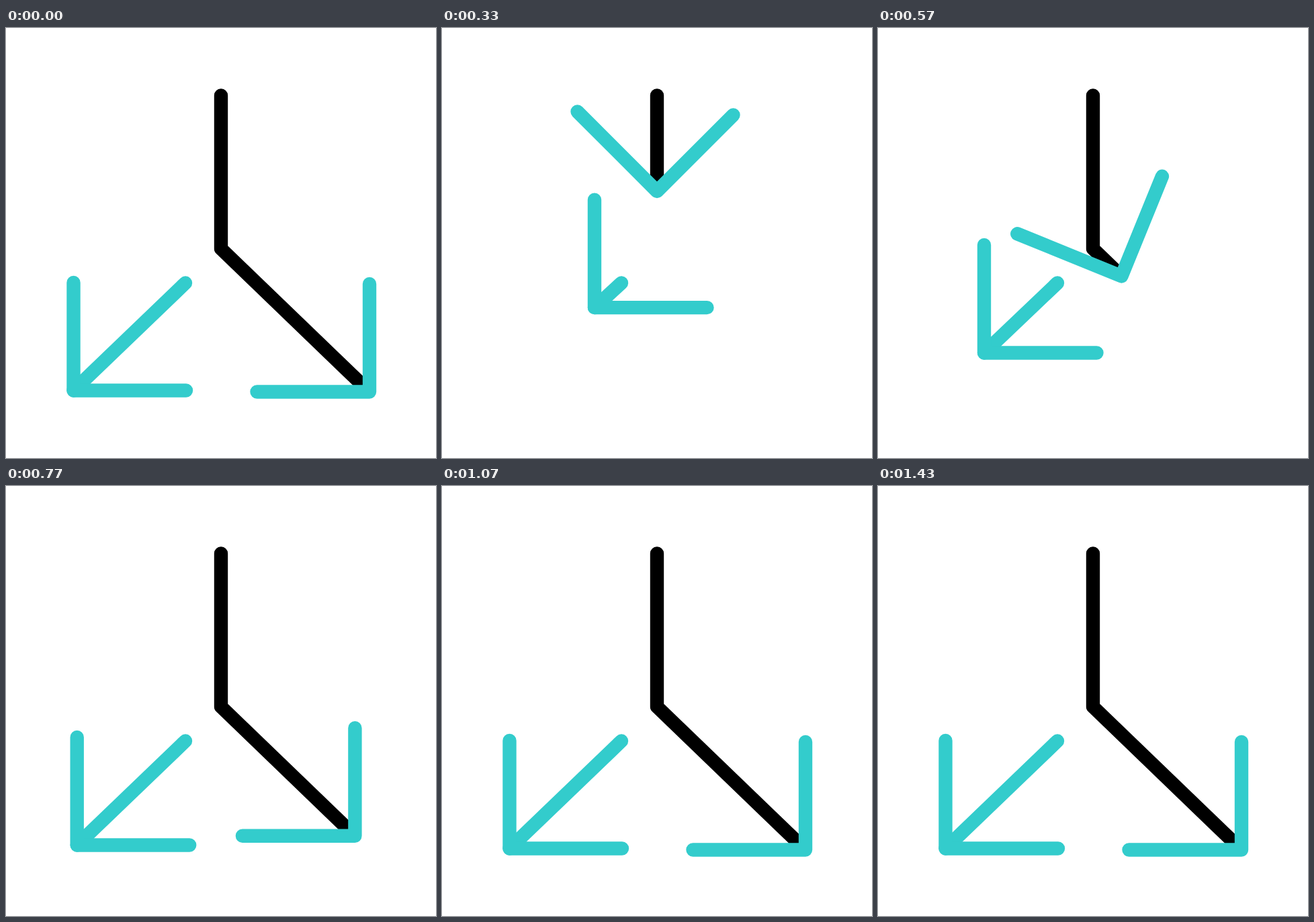
Recreate the animation shown at these times as an HTML page. Size 640x640 px, loop 2000 ms.

```html
<!DOCTYPE html>
<html lang="en">
<head>
<meta charset="utf-8">
<title>Splitting arrows</title>
<style>
  html, body { margin: 0; width: 100%; height: 100%; overflow: hidden; background: #fff; }
  svg { display: block; width: 100%; height: 100%; }
  path { fill: none; stroke: #3cc; stroke-width: 20.4; stroke-linecap: round; stroke-linejoin: round; }
  #stem { stroke: #000; }
</style>
</head>
<body>
<svg viewBox="0 0 640 640">
  <path id="stem"/>
  <path id="tail"/>
  <path id="left" d="M0-160.5V0H167.5"/>
  <path id="right" d="M0-160.5V0H-167.5"/>
</svg>
<script>
  const LOOP = 2000, STEP = 100 / 3;
  const CORNER = { x: 320, y: 328.5 }, END = { x: 541, y: 541.5 };
  const DIAG = Math.hypot(END.x - CORNER.x, END.y - CORNER.y);
  const TURN = 116; // length of the bend past the corner

  // [step, distance pulled back from rest]
  const rightPull = curve([[0, 0], [5, 187], [10, 392.5], [14, 463], [16, 413],
    [17, 248], [20, 92], [23, 30], [27, 6], [32, 0]]);
  const leftPull = curve([[0, 0], [5, 52], [10, 126.5], [13, 146], [16, 95],
    [17, 57.5], [20, 21], [23, 5.2], [26, -3], [32, 0]]);

  const el = id => document.getElementById(id);
  const stem = el('stem'), tail = el('tail'), left = el('left'), right = el('right');

  // Smooth curve through the points without extra overshoot.
  function curve(pts) {
    const last = pts.length - 1;
    const slope = i => (pts[i + 1][1] - pts[i][1]) / (pts[i + 1][0] - pts[i][0]);
    const tangent = i => {
      if (i === 0 || i === last) return 0;
      const a = slope(i - 1), b = slope(i);
      return a * b <= 0 ? 0 : 2 * a * b / (a + b);
    };
    return t => {
      if (t >= pts[last][0]) return pts[last][1];
      let i = 0;
      while (t >= pts[i + 1][0]) i++;
      const [t0, v0] = pts[i], [t1, v1] = pts[i + 1];
      const h = t1 - t0, u = (t - t0) / h, w = 1 - u;
      return v0 * (1 + 2 * u) * w * w + h * tangent(i) * u * w * w
        + v1 * u * u * (3 - 2 * u) - h * tangent(i + 1) * u * u * w;
    };
  }

  function place(node, x, y, angle = 0) {
    node.setAttribute('transform', `translate(${x} ${y}) rotate(${angle})`);
  }

  // Point on the stem; d is measured from the corner, negative going up.
  function onStem(d) {
    if (d < 0) return { x: CORNER.x, y: CORNER.y + d };
    const k = d / DIAG;
    return { x: CORNER.x + (END.x - CORNER.x) * k, y: CORNER.y + (END.y - CORNER.y) * k };
  }

  function draw(step) {
    const d = DIAG - rightPull(step);
    const tip = onStem(d), cut = onStem(d - 3);
    const bend = d > 3 ? `L${CORNER.x} ${CORNER.y}` : '';
    stem.setAttribute('d', `M320 100.5${bend}L${cut.x} ${cut.y}`);
    place(right, tip.x, tip.y, 45 * (1 - Math.min(1, Math.max(0, d / TURN))));

    const pull = leftPull(step);
    const x = 100.5 + pull, y = 539.5 - pull * 0.975;
    tail.setAttribute('d', `M267 379.5L${x} ${y}`);
    place(left, x, y);
  }

  function tick() {
    const t = performance.now() % LOOP;
    draw(Math.floor((t + 3.4) / STEP) % 60);
    requestAnimationFrame(tick);
  }
  tick();
</script>
</body>
</html>
```
